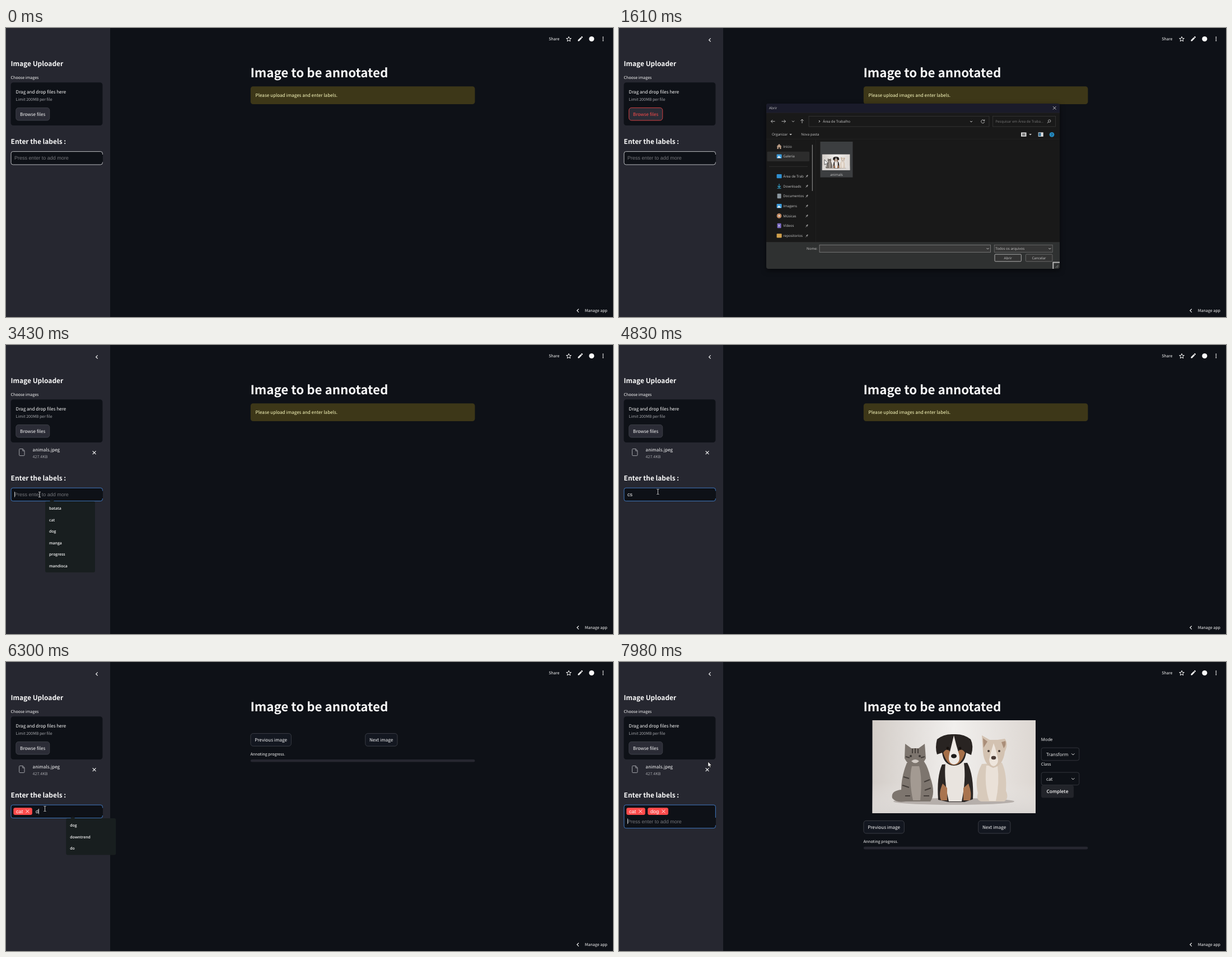
An HTML page that plays this animation: 1084x516 px, repeating every 8 s.

```html
<!DOCTYPE html>
<html lang="en">
<head>
<meta charset="utf-8">
<title>Image annotation demo</title>
<style>
html, body { margin: 0; width: 100%; height: 100%; overflow: hidden; background: #0e1117; }
svg { display: block; width: 1084px; height: 516px; }
text { font-family: "Noto Sans CJK JP", "Noto Sans CJK SC", "Noto Sans CJK", sans-serif; fill: #fafafa;
  text-rendering: geometricPrecision; white-space: pre; }
.a { font-family: "Liberation Sans", Arial, sans-serif; }
.w { font-family: "Open Sans", "Noto Sans", sans-serif; }
.b { font-weight: 700; }
.s { font-weight: 600; }
.m { text-anchor: middle; }
</style>
</head>
<body>
<svg viewBox="0 0 1084 516">
  <defs>
    <linearGradient id="wall">
      <stop offset="0" stop-color="#d3cdc8"/><stop offset=".5" stop-color="#f1efed"/><stop offset="1" stop-color="#ddd7d2"/>
    </linearGradient>
    <linearGradient id="floor" x2="0" y2="1">
      <stop offset="0" stop-color="#e9e6e4" stop-opacity="0"/><stop offset="1" stop-color="#d9d5d2"/>
    </linearGradient>
    <g id="photo">
      <rect x="452.5" y="104" width="291.5" height="166" fill="url(#wall)"/>
      <rect x="452.5" y="215" width="291.5" height="55" fill="url(#floor)"/>
      <ellipse cx="598" cy="249" rx="108" ry="6" fill="#b5aeaa"/>
      <g fill="#7d756e">
        <path d="M514 180Q504 205 504 228Q485 230 488 243Q495 252 512 249L556 249Q566 235 556 206Q552 188 545 178Z"/>
        <path d="M510 172L511 146L522 154H535L546 146L548 172Q542 185 529 185T510 172Z"/>
      </g>
      <path d="M523 186Q517 210 525 247H538Q542 207 536 186Z" fill="#a39a92"/>
      <path d="M524 155V163M529 154V163M534 155V163M512 169L519 171M546 169L539 171M508 205L518 208M506 220L518 224M555 210L545 214M557 225L546 229M511 239H520M544 239H554" stroke="#443e3a" stroke-width="2" fill="none"/>
      <g fill="#3a3632"><circle cx="521" cy="168" r="2"/><circle cx="537" cy="168" r="2"/></g>
      <path d="M522 177Q529 171 536 177Q529 184 522 177Z" fill="#d2cbc5"/>
      <path d="M577 183Q567 205 570 246L588 250H617L632 245Q634 202 622 180Z" fill="#2b2624"/>
      <path d="M583 180Q580 210 589 249H612Q620 210 616 180Z" fill="#e9e4df"/>
      <path d="M578 217Q570 235 575 247H586V225ZM624 217Q631 235 627 247H615V225Z" fill="#a9744f"/>
      <path d="M598 129Q580 128 568 138Q564 153 568 165L577 162Q580 184 598 185Q617 184 620 162L629 166Q634 150 628 138Q616 128 598 129Z" fill="#292422"/>
      <path d="M579 162Q585 152 592 161L598 184Q585 183 579 162ZM618 162Q612 152 604 161L598 184Q612 183 618 162Z" fill="#a66f48"/>
      <path d="M598 131Q594 148 590 164Q586 181 598 183Q611 181 607 164Q602 148 598 131Z" fill="#eee9e5"/>
      <ellipse cx="598" cy="168" rx="5" ry="3.8" fill="#1d1a19"/>
      <g fill="#17100d"><circle cx="587" cy="154" r="2.4"/><circle cx="609" cy="154" r="2.4"/></g>
      <path d="M648 182Q634 208 641 234Q637 247 647 249H688Q697 243 691 230Q693 200 684 180Z" fill="#d8cabb"/>
      <path d="M656 185Q652 220 661 248H673Q680 215 676 185Z" fill="#eae1d8"/>
      <path d="M650 160L648 131L662 139H676L689 137Q696 146 689 160Q686 185 668 189Q652 184 650 160Z" fill="#d3c2b1"/>
      <path d="M651 153L650 136L658 142ZM683 143L690 141Q692 148 687 154Z" fill="#aa8e79"/>
      <path d="M669 145Q664 160 661 174Q662 185 669 186Q677 184 677 174Q674 158 669 145Z" fill="#eee5dc"/>
      <ellipse cx="669" cy="171" rx="4.3" ry="3.3" fill="#4b3c36"/>
      <g fill="#433731"><circle cx="660" cy="159" r="2"/><circle cx="679" cy="159" r="2"/></g>
    </g>
  </defs>
  <g id="scene"></g>
</svg>
<script>
const LOOP = 8000;
const RED = '#ff4b4b', DARK = '#0e1117', PANEL = '#262730', EDGE = '#45474f', GREY = '#a3a4a9', WIN = '#c8c8c8';

const text = (x, y, s, size = 8.1, cls = '', fill = '') =>
  `<text x="${x}" y="${y}" font-size="${size}" class="${cls}"${fill && ` style="fill:${fill}"`}>${s}</text>`;
const rect = (x, y, w, h, fill, r = 0, stroke = 'none') =>
  `<rect x="${x}" y="${y}" width="${w}" height="${h}" rx="${r}" fill="${fill}" stroke="${stroke}" stroke-width=".8"/>`;
const line = (d, color = '#fafafa', w = 1) => `<path d="${d}" fill="none" stroke="${color}" stroke-width="${w}"/>`;
const shape = (d, fill) => `<path d="${d}" fill="${fill}"/>`;
const dot = (x, y, r, fill) => `<circle cx="${x}" cy="${y}" r="${r}" fill="${fill}"/>`;
const cross = (x, y, r, color, w) => line(`M${x - r} ${y - r}l${2 * r} ${2 * r}m0 ${-2 * r}l${-2 * r} ${2 * r}`, color, w);
const down = (x, y, r = 2.5, color = WIN) => line(`M${x - r} ${y - r / 2}l${r} ${r}l${r} ${-r}`, color);
const group = (attrs, s) => `<g ${attrs}>${s}</g>`;

// latest entry [time, value] that has started
const at = (keys, t) => keys.filter(k => k[0] <= t).pop();

const ctx = document.createElement('canvas').getContext('2d');
ctx.font = '90.4px "Liberation Sans", Arial, sans-serif';
const typedWidth = s => ctx.measureText(s).width / 10;

const typing = [[0, ''], [3290, ''], [3690, 'c'], [3830, 'cs'], [4890, 'c'], [4970, 'ca'], [5090, 'cat'], [5490, ''],
  [6160, 'd'], [6430, 'do'], [6560, 'dog'], [6700, '']];
const hintsC = ['cat', 'carro', 'casa'], hintsD = ['dog', 'downtrend', 'do'];
const hints = [[0, []], [3290, ['batata', 'cat', 'dog', 'manga', 'progress', 'mandioca']], [3690, hintsC], [3830, []],
  [4890, hintsC], [4970, ['cat']], [5090, []], [6160, hintsD], [6560, []]];

const easeIn = u => u * u, easeOut = u => u * (2 - u), smooth = u => u * u * (3 - 2 * u);
// time, x, y, easing towards the next point
const route = [[70, 750, 397, smooth], [670, 48, 153, smooth], [1000, 48, 153, easeIn], [1210, 125, 199, easeOut],
  [1610, 367, 235, smooth], [2520, 367, 235, smooth], [3150, 60, 267, smooth], [4360, 60, 267, smooth],
  [4420, 69.5, 262, smooth], [7300, 69.5, 262, smooth], [7980, 159, 178, smooth]];

function pointer(t) {
  const i = route.findLastIndex(k => k[0] <= t);
  if (i < 0) return null;
  const [t0, x, y, ease] = route[i], [t1, x1, y1] = route[i + 1] || [t0 + 1, x, y];
  const u = ease(Math.min(1, Math.floor((t - t0) / 68) * 68 / (t1 - t0)));
  return { x: x + (x1 - x) * u, y: y + (y1 - y) * u };
}

function drawPointer({ x, y }, t) {
  if (t > 2900 && x < 173 && y > 255)
    return line(`M${x - 2} ${y - 4.5}h1.5l.5 .5l.5 -.5h1.5M${x} ${y - 4}v8M${x - 2} ${y + 4.5}h1.5l.5 -.5l.5 .5h1.5`, '#ddd', .9);
  return `<path transform="translate(${x} ${y})" d="M0 0V9.2L2.1 7.3L3.6 10.4L5 9.8L3.6 6.7H6.4Z" fill="#fff" stroke="#000" stroke-width=".6"/>`;
}

const button = (x, y, w, s, fill = '#131720', hot = false) =>
  rect(x, y, w, 22.6, fill, 4.5, hot ? RED : EDGE) + text(x + 7.3, y + 14.4, s, 8.1, '', hot ? RED : '');

function chrome() {
  const star = [...Array(10)].map((_, i) => {
    const a = i * Math.PI / 5, r = i % 2 ? 2 : 4.6;
    return `${1005 + r * Math.sin(a)} ${20 - r * Math.cos(a)}`;
  }).join('L');
  return rect(0, 0, 1084, 516, DARK) + rect(0, 0, 186, 516, PANEL)
    + text(969.3, 22.4, 'Share', 7.08) + line(`M${star}Z`)
    + shape('M1021.4 23.4V21.4L1026.4 16.4L1028.4 18.4L1023.4 23.4ZM1026.9 15.9L1027.9 14.9Q1028.4 14.6 1028.8 15L1029.8 16Q1030.1 16.5 1029.8 16.9L1028.9 17.9Z', '#fafafa')
    + dot(1045.8, 19.5, 4.6, '#fafafa') + [16.4, 19.5, 22.6].map(y => dot(1066.3, y, 1, '#fafafa')).join('')
    + line('M1022.8 501.6l-3 3l3 3', '#fafafa', 1.2) + text(1033.8, 507.2, 'Manage app', 7.08)
    + text(436.5, 88.2, 'Image to be annotated', 22.25, 'b');
}

function labelInput(t, y) {
  const [since, typed] = at(typing, t), focus = t >= 3290, hasCat = t >= 5490, twoRows = t >= 6700;
  const h = twoRows ? 41.5 : 23.4, x = hasCat && !twoRows ? 53 : 15, base = y + (twoRows ? 32.3 : 14.8);
  const tag = (tx, w, s) => rect(tx, y + 5, w, 12.8, RED, 3) + text(tx + 4.8, base - (twoRows ? 18 : .3), s, 9.04, 'a', '#fff')
    + cross(tx + w - 8.5, y + 11.4, 2.9, '#fff', .9);
  return rect(9, y, 163.4, h, DARK, 3.5, focus ? '#4a90e8' : '#e4e5e8') + rect(168, base - 9.5, 5, 13.5, DARK)
    + (hasCat ? tag(13.3, 33.5, 'cat') : '') + (twoRows ? tag(51.3, 36.7, 'dog') : '')
    + (typed ? text(x, base, typed, 9.04, 'a') : text(x, base, 'Press enter to add more', 9.04, 'a', '#74757a'))
    + (focus && (t - since) % 1060 < 530 ? rect(x + typedWidth(typed), base - 8, .8, 9.6, '#eee') : '');
}

function sidebar(t, chevron) {
  const uploaded = t >= 2520, dy = uploaded ? 34.6 : 0, hot = t >= 600 && t < 2450;
  return (chevron ? line('M163.7 18.4l-3 3l3 3', '#fafafa', 1.2) : '')
    + text(8.6, 68.4, 'Image Uploader', 11.95, 'b') + text(8.6, 91.2, 'Choose images', 7.08)
    + rect(8.6, 97.2, 163.8, 76.8, DARK, 4.5)
    + text(17.6, 116.7, 'Drag and drop files here') + text(17.6, 130.4, 'Limit 200MB per file', 7.08, '', GREY)
    + button(17.8, 142.4, 60, 'Browse files', '#2b2c36', hot)
    + (uploaded ? line('M30 185.4h-5.2q-1.2 0 -1.2 1.2v9.8q0 1.2 1.2 1.2h7q1.2 0 1.2 -1.2v-7.6ZM29.8 185.6v3.4h3.2', GREY)
      + text(47.6, 190.4, 'animals.jpeg') + text(47.6, 202.2, '427.4KB', 7.08, '', GREY) + cross(157.6, 192.3, 2.9, '#fafafa', 1.1) : '')
    + text(8.6, 207 + dy, 'Enter the labels :', 11.95, 'b') + labelInput(t, 220.6 + dy);
}

function main(t) {
  if (t < 5760) return rect(436.8, 104.2, 400.6, 31.8, '#3d3718', 4.5) + text(445.6, 123.4, 'Please upload images and enter labels.', 8.1, '', '#ffffc2');
  const image = t >= 6890, y = image ? 155.8 : 0;
  const select = (sy, s) => rect(754.2, sy, 67.6, 22.6, DARK, 3.5, '#3b3e46') + text(763, sy + 14.4, s, 8.2, 'w') + down(810.8, sy + 11.5, 2.6, '#eee');
  return (image ? '<use href="#photo"/>' + text(753.8, 141.2, 'Mode', 7.7, 'w') + select(153.2, 'Transform')
      + text(753.8, 185, 'Class', 7.4, 'w') + select(197.1, 'cat')
      + rect(754, 220, 58, 22.4, '#22242a', 3.5) + text(783, 234.2, 'Complete', 8.4, 'w s m') : '')
    + button(436.9, 127.6 + y, 72.4, 'Previous image') + button(641.7, 127.6 + y, 57.2, 'Next image')
    + text(436.5, 167.4 + y, 'Annoting progress.', 7.08) + rect(436.8, 174 + y, 400.6, 4.6, PANEL, 2.3);
}

function hintList(t) {
  const list = at(hints, t)[1], x = t < 5490 ? 70 : 107.3;
  if (!list.length) return '';
  return shape(`M${x + 8} 279l4 -3l4 3Z`, '#181e1f') + rect(x, 279, 89, list.length * 20.5 + 4, '#181e1f', 3)
    + list.map((s, i) => text(x + 7, 294 + i * 20.5, s, 6.9, 'w s')).join('');
}

const label = (x, y, s, fill = WIN, cls = 'w') => text(x, y + 2.3, s, 6.2, cls, fill);

function loadingPanes() {
  const boxes = [[335.3, 389.2, 20, 8.5], [358, 387.4, 306, 13.2], [671, 387.4, 104.5, 13.2], [671, 403.3, 49, 14.2],
    [726, 403.3, 49, 14.2], [775, 417.8, 12, 12]];
  return dot(272, 143, 4.2, '#a39c86') + label(279.5, 143, 'Abrir')
    + rect(263, 151.6, 524, 230.6, '#d3d3d3') + rect(264, 199.3, 86, 183, '#191919')
    + boxes.map(([x, y, w, h]) => rect(x, y, w, h, '#d3d3d3')).join('') + rect(344.8, 208.5, 1, 83, '#999');
}

function fileBrowser(t) {
  const places = [['Início', 211.5, '#b79a83'], ['Galeria', 229, '#3b9bdb'], ['Área de Trab', 264.5, '#2f8fd0'], ['Downloads', 282.2, '#35a0c8'],
    ['Documentos', 300, '#8b979f'], ['Imagens', 317.7, '#3b9bdb'], ['Músicas', 335.4, '#c08a63'], ['Vídeos', 353, '#7d6cc4'], ['repositorios', 370.8, '#d0a04c']];
  const icon = (y, c, i) => {
    if (i == 0) return shape(`M281.5 ${y}l4.5 -4.5l4.5 4.5h-1v4.5h-2.4v-3h-2.2v3h-2.4v-4.5Z`, c);
    if (i == 3) return line(`M286 ${y - 4}v6.5m-2.7 -2.7l2.7 2.7l2.7 -2.7M282.5 ${y + 4}h7`, c, 1.1);
    if (i == 6) return dot(286, y, 4.3, c) + dot(286, y, 1.3, '#eee');
    const tall = i == 4 || i == 7;
    return rect(tall ? 282.6 : 281.6, y - (tall ? 4.3 : 3.6), tall ? 7 : 9, tall ? 8.6 : 7.4, c, 1)
      + (i == 1 || i == 5 ? shape(`M282.5 ${y + 3}l3 -4l4 4Z`, '#eee') : i == 7 ? shape(`M285 ${y - 1.5}l2.5 1.5l-2.5 1.5Z`, '#eee') : '');
  };
  const picked = t >= 1670, over = t >= 1560;
  return label(268, 143, 'Abrir') + rect(263, 151.6, 524, 230.6, '#191919') + line('M263 198.3H787M351.3 198.3V382', '#252525', .8)
    + line('M278.5 166.7h-7m2.8 -2.8l-2.8 2.8l2.8 2.8M290.5 166.7h7m-2.8 -2.8l2.8 2.8l-2.8 2.8M327 170v-7m-2.8 2.8l2.8 -2.8l2.8 2.8', WIN, .9)
    + down(311, 166.7, 2) + rect(339, 157.4, 322, 18.6, '#191919', 0, '#383838') + rect(667.4, 157.4, 112, 18.6, '#191919', 0, '#383838')
    + line('M357 165l1.7 1.7l-1.7 1.7') + label(364, 166.7, 'Área de Trabalho') + down(629, 167, 2)
    + line('M652.4 165.5a3 3 0 1 0 .3 2M652.8 163.3v2.4h-2.4', WIN, .9)
    + label(672.3, 166.7, 'Pesquisar em Área de Traba...', '#777') + `<circle cx="768.7" cy="166" r="2.2" fill="none" stroke="${WIN}" stroke-width=".8"/>` + line('M767 167.8l-2 2', WIN)
    + label(273, 190, 'Organizar') + shape('M304.3 189l4.6 0l-2.3 2.6Z', WIN) + label(325.3, 190, 'Nova pasta')
    + rect(718, 186.5, 9.5, 7.3, '#ddd', 0) + rect(720, 188, 5.5, 4.3, '#777') + shape('M732.2 189l4.8 0l-2.4 2.6Z', WIN)
    + rect(748.7, 186.3, 9, 7.6, '#ddd') + rect(749.5, 187.2, 4, 5.8, '#2d6a91') + dot(773, 190.3, 4.4, '#248ac0') + label(773, 190.3, '?', '#111', 'w m')
    + rect(264.5, 220.7, 75.5, 17.4, '#2c2c2c', 1.5) + line('M268 247.3H337', '#333', .8)
    + places.map(([s, y, c], i) => icon(y, c, i) + label(293.3, y, s)
      + (i > 1 ? line(`M333.2 ${y + 2.7}l2 -2M334 ${y - .8}l2.6 2.6`, '#999', .8) + line(`M335 ${y + .6}l2.2 -2.4`, '#999', 1.8) : '')).join('')
    + rect(344.8, 208.5, 1, 82.5, '#999')
    + (over ? rect(359.4, 202.9, 58, 63.8, picked ? '#616366' : '#3c3e40', 0, picked ? '#909294' : 'none') : '')
    + `<use href="#photo" transform="translate(362.8 225.6) scale(.17) translate(-452.5 -104)"/>` + label(388.4, 261.3, 'animals', WIN, 'w m')
    + label(335, 393.7, 'Nome:') + rect(358, 387.3, 305.5, 13, '#383838', 0, '#858585') + (picked ? label(360, 394, 'animals') : '')
    + down(658.5, 394, 2) + rect(670.2, 387.3, 104, 13, '#353535', 0, '#707070') + label(672.3, 393.8, 'Todos os arquivos') + down(769.3, 394, 2)
    + rect(671, 404, 47.3, 12.8, '#333', 1.5, '#d0d0d0') + label(694.7, 410.3, 'Abrir', WIN, 'w m')
    + rect(726.3, 404, 47.6, 12.8, '#333', 1.5, '#777') + label(750, 410.3, 'Cancelar', WIN, 'w m')
    + line('M775.3 430V418.6H787', '#b5b5b5', 2) + line('M779.5 428l5 -5M782 428l2.5 -2.5', '#999', .8);
}

function dialog(t) {
  const opened = Math.min(1, (t - 1140) / 200), k = .948 + .052 * opened;
  const alpha = t < 1210 ? .6 : t < 2190 ? 1 : 1 - (t - 2190) / 200;
  if (opened < 0 || alpha <= 0) return '';
  return group(`opacity="${alpha}" transform="translate(479 256) scale(${k}) translate(-479 -256)" style="filter:drop-shadow(0 3px 5px #0008)"`,
    rect(263, 135, 524, 295, '#2f3131', 4) + shape('M263 151.6V139q0 -4 4 -4H783q4 0 4 4V151.6Z', '#1a1b2a')
    + cross(777.7, 142.8, 2.7, '#ddd', .9) + (opened < 1 ? loadingPanes() : fileBrowser(t)));
}

function scene(t) {
  const p = pointer(t), modal = t >= 1140 && t < 2450;
  return chrome() + sidebar(t, p && (p.x < 186 || modal)) + main(t) + hintList(t) + dialog(t) + (p ? drawPointer(p, t) : '');
}

const root = document.getElementById('scene');
let shown, start;
function frame(now) {
  start ??= now;
  const next = scene((now - start) % LOOP);
  if (next !== shown) root.innerHTML = shown = next;
  requestAnimationFrame(frame);
}
requestAnimationFrame(frame);
</script>
</body>
</html>
```
